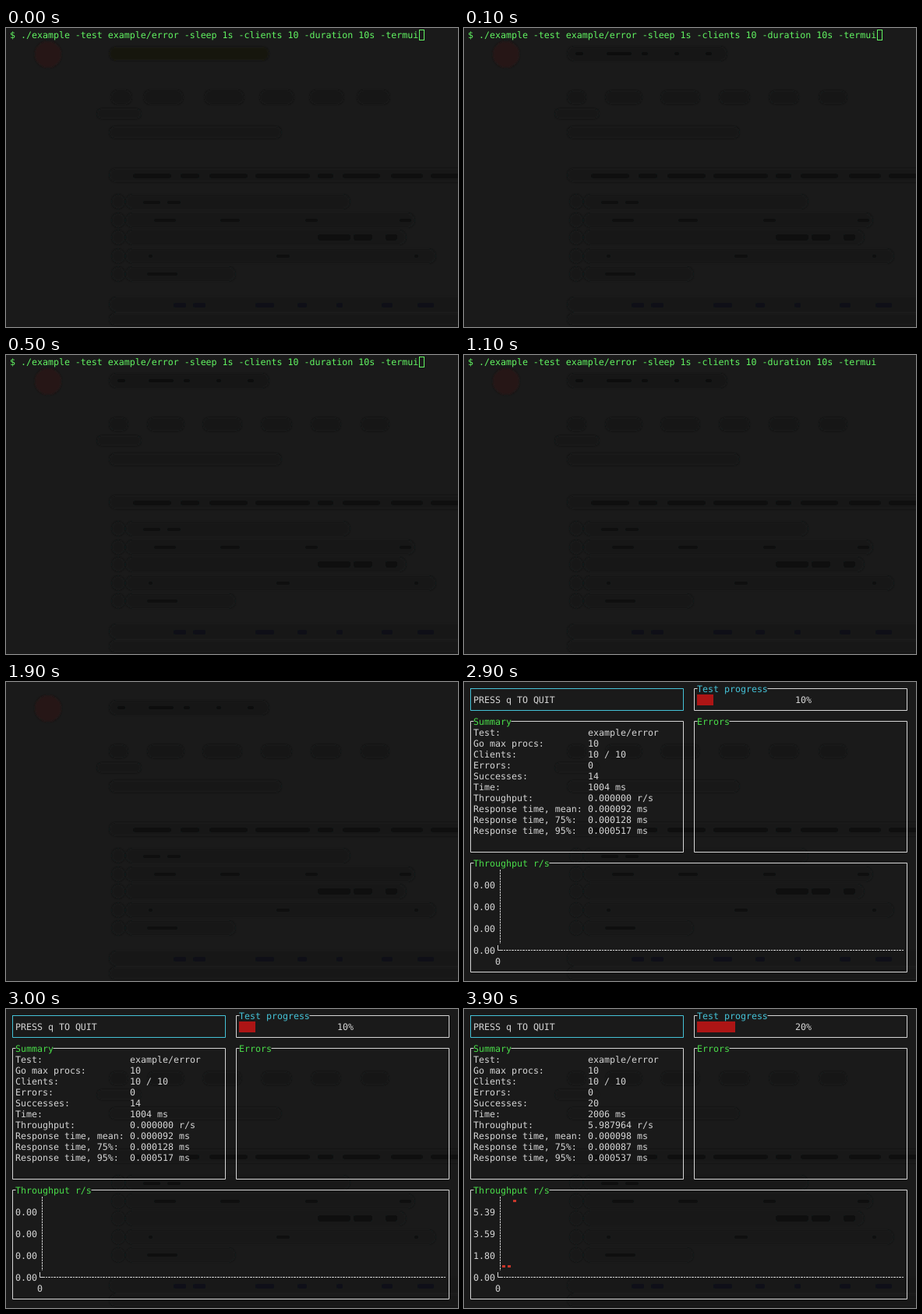
An HTML page for the animation above (4500 ms loop, 580x384 px).

```html
<!DOCTYPE html>
<html lang="en">
<head>
<meta charset="utf-8">
<title>Load test in a terminal</title>
<style>
  html, body { margin: 0; width: 100%; height: 100%; overflow: hidden; background: #1a1a1a; }
  svg { display: block; width: 580px; height: 384px; }
  /* 11.628px gives this face an advance of 7px */
  text { font: 11.628px "DejaVu Sans Mono", monospace; white-space: pre; text-rendering: geometricPrecision; }
</style>
</head>
<body>
<svg id="stage" viewBox="0 0 580 384">
  <defs><filter id="soft" x="-5%" y="-5%" width="110%" height="110%"><feGaussianBlur stdDeviation="1"/></filter></defs>
</svg>
<script>
const LOOP = 4500, CELL = 7, ROW = 14;
const WHITE = '#d6d6d6', GREEN = '#4ade4a', CYAN = '#45c3d8', LIME = '#62f562';
const stage = document.getElementById('stage');

function add(parent, tag, attrs = {}, content = '') {
  const node = document.createElementNS('http://www.w3.org/2000/svg', tag);
  for (const key in attrs) node.setAttribute(key, attrs[key]);
  node.textContent = content;
  return parent.appendChild(node);
}
const group = (parent = stage, attrs = {}) => add(parent, 'g', attrs);

// Terminal grid: column and row to pixels
const left = col => 5 + col * CELL;
const midX = col => left(col) + 3.5;
const midY = row => 8.5 + row * ROW;

const write = (parent, col, row, content, fill = WHITE) =>
  add(parent, 'text', { x: left(col), y: midY(row) + 4.5, fill }, content);

function panel(parent, c1, r1, c2, r2, title = '', color = WHITE, titleColor = GREEN) {
  const start = title ? left(1 + c1 + title.length) : midX(c1);
  const lead = title ? `H${left(c1 + 1)}` : '';
  add(parent, 'path', {
    d: `M${start} ${midY(r1)}H${midX(c2)}V${midY(r2)}H${midX(c1)}V${midY(r1)}${lead}`,
    fill: 'none', stroke: color, 'stroke-linecap': 'square'
  });
  if (title) write(parent, c1 + 1, r1, title, titleColor);
}

// Dim page showing through the window
const page = group(stage, { filter: 'url(#soft)' });
function smudge(parent, y, height, fill, spans) {
  for (const [x1, x2] of spans)
    add(parent, 'rect', { x: x1, y: y - height / 2, width: x2 - x1, height, rx: height / 2.2, fill });
}
const body = group(page, { opacity: 0.9 });
const BLOB = '#141717', INK = '#0e1010';
smudge(body, 110, 13, BLOB, [[117, 173]]);
smudge(body, 134, 15, BLOB, [[133, 353]]);
smudge(body, 189, 17, BLOB, [[133, 590]]);
[[223, 441], [247, 524], [269, 513], [293, 551], [316, 294]].forEach(([y, end]) =>
  smudge(body, y, 18, BLOB, [[136, 152], [154, end]]));
smudge(body, 355, 18, BLOB, [[133, 590]]);
smudge(body, 374, 15, BLOB, [[133, 590]]);
smudge(body, 190, 5, INK, [[163, 212], [224, 248], [261, 310], [320, 390], [400, 420], [432, 480], [494, 535], [545, 590]]);
smudge(body, 269, 8, INK, [[400, 442], [446, 470], [487, 502]]);
smudge(body, 247, 3, INK, [[190, 218], [275, 300], [384, 400], [505, 520]]);
smudge(body, 293, 4, INK, [[183, 188], [347, 364], [524, 529]]);
smudge(body, 224, 3, INK, [[176, 198], [207, 224]]);
smudge(body, 316, 3, INK, [[181, 220]]);
smudge(body, 356, 6, '#10131b', [[215, 231], [240, 256], [320, 344], [374, 386], [424, 432], [482, 496], [528, 549]]);

const tabsEarly = group(page);
smudge(tabsEarly, 89, 18, '#151616', [[135, 161], [177, 227], [255, 305], [326, 369], [390, 433], [451, 492]]);
const tabsLate = group(page);
smudge(tabsLate, 89, 17, BLOB, [[133, 156], [182, 228], [253, 302], [328, 366], [392, 429], [456, 491]]);

const headEarly = group(page);
smudge(headEarly, 33, 17, '#15150f', [[133, 337]]);
const headLate = group(page);
smudge(headLate, 33, 18, BLOB, [[133, 337]]);
smudge(headLate, 33, 4, INK, [[143, 153], [183, 215], [228, 236], [270, 276], [310, 318]]);
const mark = add(page, 'circle', { cx: 54, cy: 34, r: 17, fill: '#251716' });

// Shell prompt
const command = '$ ./example -test example/error -sleep 1s -clients 10 -duration 10s -termui';
const prompt = group();
write(prompt, 0, 0, command, LIME);
const cursorX = left(command.length);
const hollow = add(stage, 'rect', { x: cursorX + .5, y: 2.5, width: 6, height: 13, fill: 'none', stroke: LIME });
const solid = add(stage, 'rect', { x: cursorX, y: 2, width: 7, height: 14, fill: '#55ff45' });

// Dashboard
const board = group();
panel(board, 0, 0, 39, 2, '', CYAN);
write(board, 1, 1, 'PRESS q TO QUIT');
panel(board, 41, 0, 80, 2, 'Test progress', WHITE, CYAN);
panel(board, 0, 3, 39, 15, 'Summary');
panel(board, 41, 3, 80, 15, 'Errors');
panel(board, 0, 16, 80, 26, 'Throughput r/s');

const labels = ['Test:', 'Go max procs:', 'Clients:', 'Errors:', 'Successes:', 'Time:',
  'Throughput:', 'Response time, mean:', 'Response time, 75%:', 'Response time, 95%:'];
labels.forEach((label, i) => write(board, 1, 4 + i, label));
const axis = d => add(board, 'path', { d, fill: 'none', stroke: WHITE });
axis('M46.5 241V336').setAttribute('stroke-dasharray', '2.5 1');
axis('M43.5 338V344.5H47');
axis('M47 344.5H564').setAttribute('stroke-dasharray', '3 1 2 1');
write(board, 5, 25, '0');

function report({ percent, values, ticks, dots }) {
  const view = group(board);
  const cells = Math.floor(38 * percent / 100);
  add(view, 'rect', { x: left(42), y: 16, width: cells * CELL, height: ROW, fill: '#ad1515' });
  write(view, 60, 1, percent + '%');
  values.forEach((value, i) => write(view, 22, 4 + i, value));
  ticks.forEach((tick, i) => write(view, 1, 18 + 2 * i, tick));
  for (const [col, row] of dots)
    add(view, 'rect', { x: left(col) + 2, y: midY(row) - 1.5, width: 4, height: 3, fill: '#c8372b' });
  return view;
}
const setup = ['example/error', '10', '10 / 10', '0'];
const first = report({
  percent: 10,
  values: [...setup, '14', '1004 ms', '0.000000 r/s', '0.000092 ms', '0.000128 ms', '0.000517 ms'],
  ticks: ['0.00', '0.00', '0.00', '0.00'],
  dots: []
});
const second = report({
  percent: 20,
  values: [...setup, '20', '2006 ms', '5.987964 r/s', '0.000098 ms', '0.000087 ms', '0.000537 ms'],
  ticks: ['5.39', '3.59', '1.80', '0.00'],
  dots: [[6, 23], [7, 23], [8, 17]]
});

// Start time and what is shown from then on
const settled = [tabsLate, headLate, mark];
const steps = [
  [0, [tabsEarly, headEarly, mark, prompt, hollow]],
  [100, [...settled, prompt, hollow]],
  [1100, [...settled, prompt]],
  [1600, [...settled, prompt, solid]],
  [1900, settled],
  [2900, [tabsLate, board, first]],
  [3900, [tabsLate, board, second]]
];
const parts = new Set(steps.flatMap(step => step[1]));
let current;
function draw() {
  const time = performance.now() % LOOP;
  const step = steps.findLast(([start]) => start <= time);
  if (step !== current) {
    current = step;
    for (const part of parts) part.style.display = step[1].includes(part) ? '' : 'none';
  }
  requestAnimationFrame(draw);
}
draw();
</script>
</body>
</html>
```
